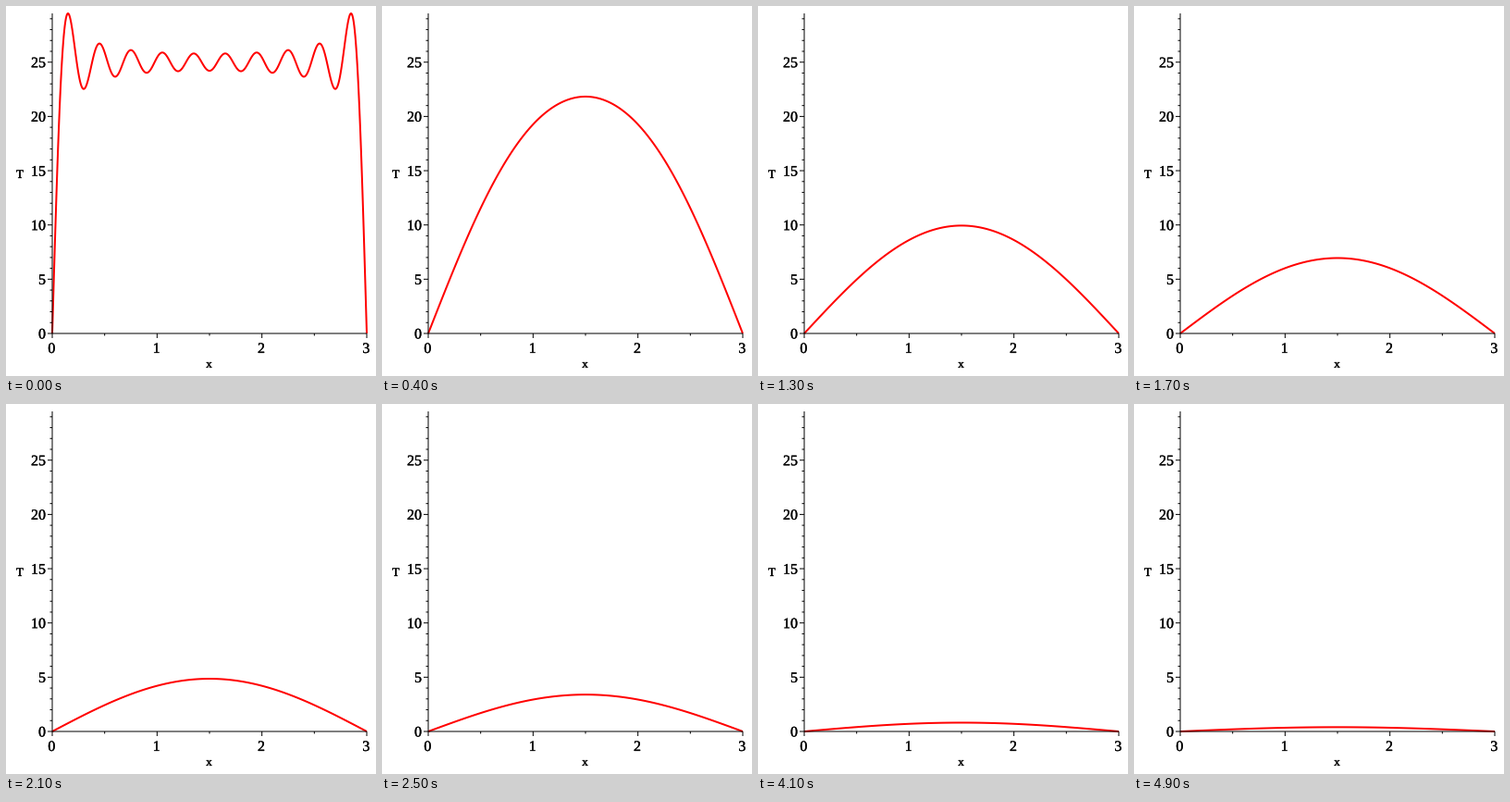
Recreate the animation shown at these times as a matplotlib script. Size 400 px wide and 400 px high, loop 5000 ms.

```python
import numpy as np
import matplotlib.pyplot as plt
from matplotlib.animation import FuncAnimation
from matplotlib.patheffects import withStroke

SIZE, DPI = 400, 100
PX = 72 / DPI  # points per pixel
FRAMES, INTERVAL = 50, 100
LENGTH, T_START, T_END = 3, 25, 4
LEFT, RIGHT, TOP, BOTTOM = 50, 390, 8, 354
MAJOR, MINOR = 5, 2.5  # tick lengths

plt.rcParams.update({
    "font.family": "Liberation Serif",
    "text.hinting": "none",
    "path.simplify": False,
})

x = np.linspace(0, LENGTH, 601)
modes = np.arange(1, 20, 2)[:, None]
waves = 4 * T_START / (np.pi * modes) * np.sin(modes * np.pi * x / LENGTH)
rates = (modes * np.pi / LENGTH) ** 2


def temperature(time):
    """Fourier solution of the heat equation on a rod with cold ends."""
    return (waves * np.exp(-rates * time)).sum(axis=0)


peak = temperature(0).max()


def to_x(value):
    return LEFT + (RIGHT - LEFT) * value / LENGTH


def to_y(value):
    return BOTTOM - (BOTTOM - TOP) * value / peak


fig = plt.figure(figsize=(SIZE / DPI, SIZE / DPI), dpi=DPI, facecolor="white")
ax = fig.add_axes([0, 0, 1, 1])
ax.set(xlim=(0, SIZE), ylim=(SIZE, 0))
ax.axis("off")


def rule(xs, ys):
    ax.plot(xs, ys, color="black", lw=PX, solid_capstyle="butt",
            snap=False, zorder=3)


def label(px, py, text, size, align="center"):
    ax.text(px, py, text, fontsize=size * PX, ha=align, va="baseline",
            path_effects=[withStroke(linewidth=0.3 * PX, foreground="black")])


rule([LEFT, LEFT], [TOP, BOTTOM])
rule([LEFT, RIGHT], [BOTTOM, BOTTOM])

for value in range(int(peak) + 1):
    major = value % 5 == 0
    y = to_y(value)
    rule([LEFT - (MAJOR if major else MINOR), LEFT], [y, y])
    if major:
        label(43, y + 5.5, str(value), 16, "right")

for half in range(2 * LENGTH + 1):
    major = half % 2 == 0
    px = to_x(half / 2)
    rule([px, px], [BOTTOM, BOTTOM + (MAJOR if major else MINOR)])
    if major:
        label(px - 0.7, 375, str(half // 2), 16)

label(15, 186, "T", 13)
label(219.5, 391, "x", 13)

curve, = ax.plot([], [], color="red", lw=2 * PX, solid_capstyle="butt",
                 solid_joinstyle="round", snap=False, zorder=2)


def update(frame):
    time = T_END * frame / (FRAMES - 1)
    curve.set_data(to_x(x), to_y(temperature(time)))
    return curve,


anim = FuncAnimation(fig, update, frames=FRAMES, interval=INTERVAL,
                     repeat=True, repeat_delay=0)
plt.show()
```
